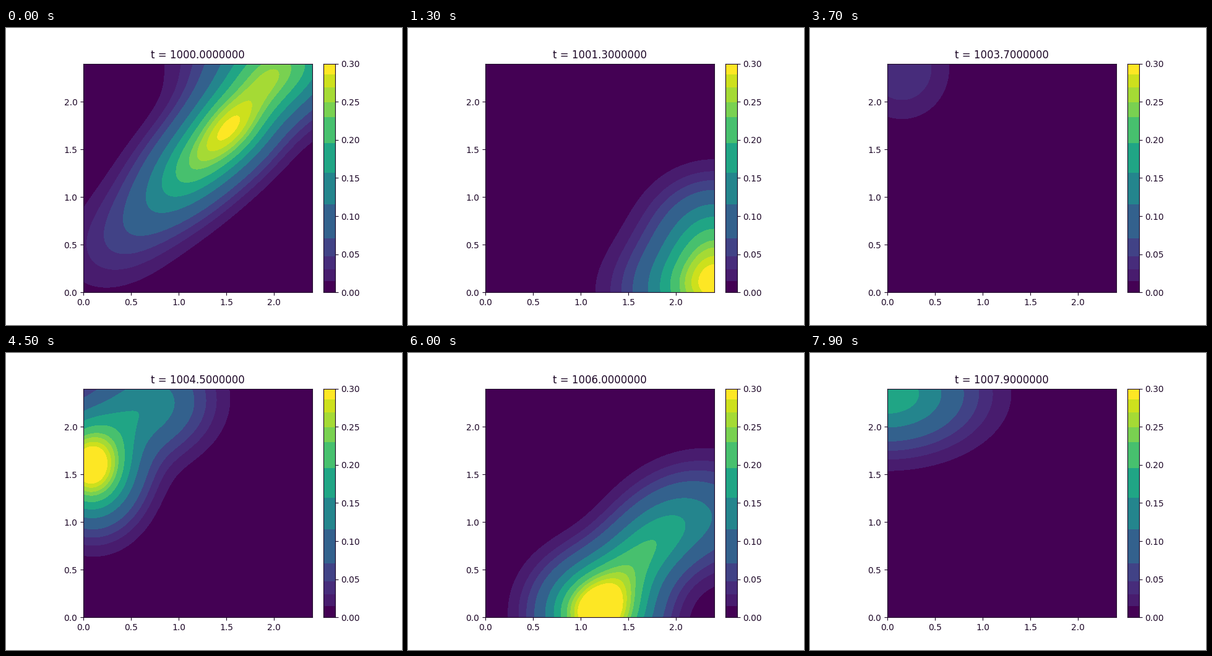
Write a matplotlib script that moves like this. It is 640 px wide and 480 px high and loops after 8000 ms.

```python
import numpy as np
import matplotlib.pyplot as plt
from matplotlib.animation import FuncAnimation
from matplotlib.colors import BoundaryNorm, ListedColormap

W, H, DPI = 640, 480, 100
SIZE, N, TOP = 2.4, 185, .3
FRAMES, STEP, FADE = 80, 0.1, 0.5
INK = "#1c0626"

LEVELS = np.array([0, .015, .03, .047, .071, .115, .157, .196,
                   .23, .249, .269, .286, TOP])
mids = (LEVELS[1:] + LEVELS[:-1]) / 2 / TOP
mids[0], mids[-1] = 0, 1
CMAP = ListedColormap(plt.get_cmap("viridis")(mids))
NORM = BoundaryNorm(LEVELS, CMAP.N, clip=True)

# Keys of each blob: time, x, y, length, height
front = [(0, 1.40, 1.58, .75, .26), (1.3, 2.4, 0, .52, .26),
         (2.1, 2.5, 0, .45, .08)]
shoulder = [(0, 2.05, 2.45, .55, .15), (1.3, 2.4, .62, .40, .15)]
core = [(0, 1.55, 1.75, .25, .03)]
foot = [(0, .3, .5, .4, .02)]

peak = [(3.7, .15, 2.35, .33, .047), (4.1, .05, 2.15, .42, .18),
        (4.5, .07, 1.62, .33, .275), (5.4, .77, .72, .24, .105),
        (6, 1.22, 0, .37, .25), (6.7, 2.35, 0, .45, .2)]
base = [(4.5, .1, 1.3, .3, .06), (5.4, 0, 0, .48, .22),
        (6, .95, .1, .35, .06)]
ridge = [(4.5, .7, 2.24, .4, .14), (5.4, .95, .97, .75, .225),
         (6, 1.65, .68, .5, .17), (6.7, 2.4, .55, .38, .11)]
wing = [(6, 2.4, 1.05, .5, .08)]

arrival = [(7.4, .05, 2.4, .4, .04), (7.9, 0, 2.34, .58, .185)]

BLOBS = [np.array(k, float) for k in (front, shoulder, core, foot, peak,
                                      base, ridge, wing, arrival)]

axis = (np.arange(N) + .5) * SIZE / N
X, Y = np.meshgrid(axis, axis)


def blob(keys, t):
    times, x, y, length, height = keys.T
    span = np.r_[times[0] - FADE, times, times[-1] + FADE]
    level = np.interp(t, span, np.r_[0, height, 0])
    if level == 0:
        return 0
    x, y, length = (np.interp(t, times, v) for v in (x, y, length))

    # Away from the walls blobs are slimmer and lie along the diagonal
    gap = min(x, y, SIZE - x, SIZE - y)
    free = np.clip(gap / .6, 0, 1)
    width = .36 - .07 * free
    c, s = np.cos(free * np.pi / 4), np.sin(free * np.pi / 4)
    a = ((X - x) * c + (Y - y) * s) / length
    b = ((Y - y) * c - (X - x) * s) / width
    return level * np.exp(-(a * a + b * b) / 2)


def density(t):
    return sum((blob(k, t) for k in BLOBS), np.zeros_like(X))


def add_axes(left, width):
    ax = fig.add_axes([left / W, .11, width / W, .77])
    ax.tick_params(color=INK, labelcolor=INK)
    for spine in ax.spines.values():
        spine.set_color(INK)
    return ax


fig = plt.figure(figsize=(W / DPI, H / DPI), dpi=DPI, facecolor="white")
look = dict(origin="lower", cmap=CMAP, norm=NORM, aspect="auto")

ax = add_axes(125.2, 369.6)
image = ax.imshow(density(0), extent=(0, SIZE, 0, SIZE),
                  interpolation="bilinear", **look)
ticks = np.arange(5) / 2
ax.set_xticks(ticks)
ax.set_yticks(ticks)
title = ax.set_title("", color=INK)

bar = add_axes(513.2, 18.5)
bar.imshow(np.linspace(0, TOP, 740)[:, None], extent=(0, 1, 0, TOP),
           interpolation="nearest", **look)
bar.set_xticks([])
bar.yaxis.tick_right()
marks = np.linspace(0, TOP, 7)
bar.set_yticks(marks, [f"{v:.2f}" for v in marks])


def update(i):
    t = i * STEP
    image.set_data(density(t))
    title.set_text(f"t = {1000 + t:.7f}")
    return image, title


anim = FuncAnimation(fig, update, frames=FRAMES, interval=100,
                     repeat=True, repeat_delay=0, blit=False)
plt.show()
```
